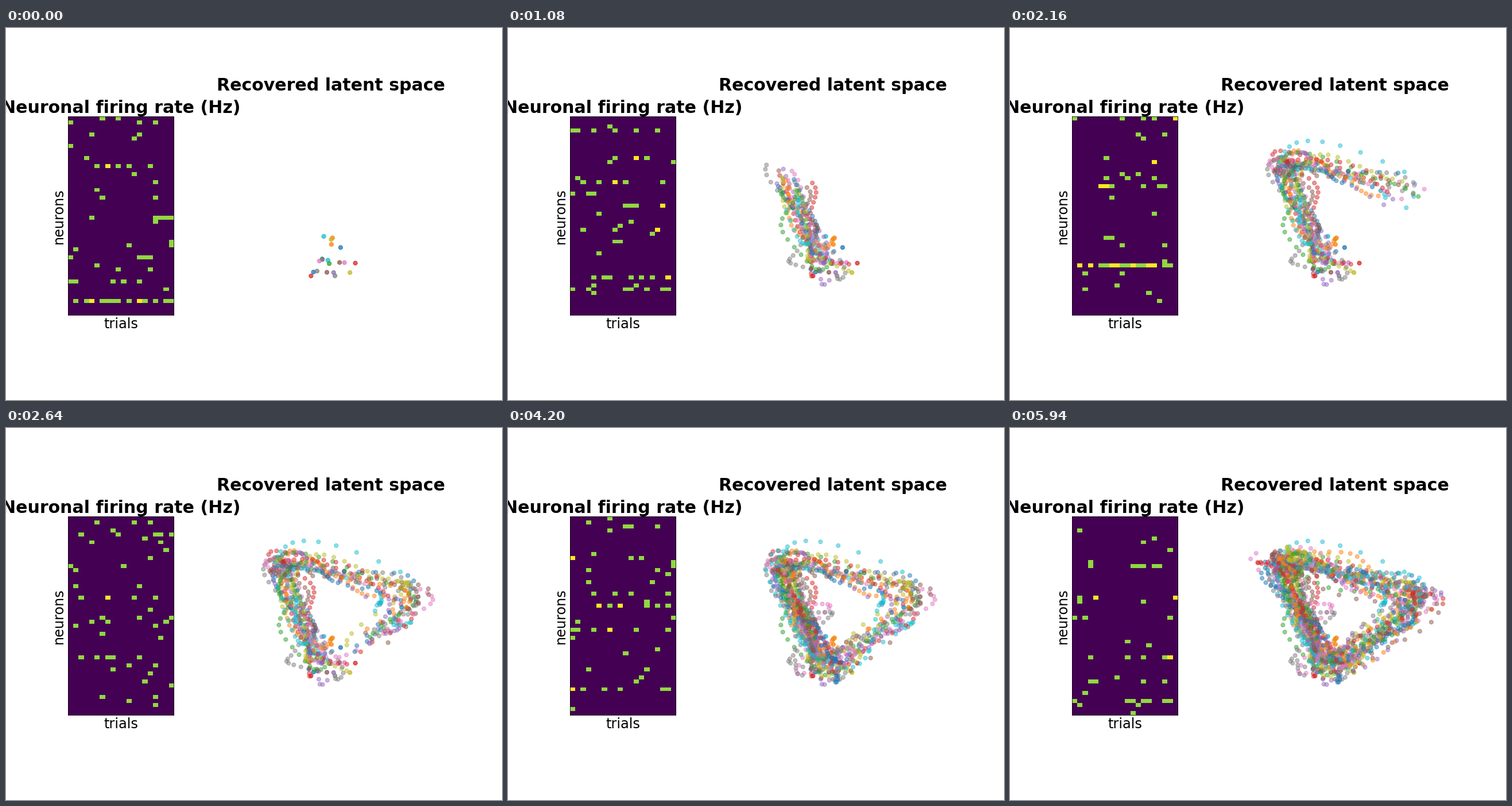
Recreate the animation shown at these times as a matplotlib script. Size 864x648 px, loop 6000 ms.

```python
import numpy as np
import matplotlib.pyplot as plt
from matplotlib.animation import FuncAnimation
from matplotlib.colors import ListedColormap

STEPS, INTERVAL = 100, 60
TRIALS, NEURONS = 20, 50
LAP = 50  # steps for one turn around the latent loop

# Corners of the latent loop, in stage pixels, and when they are passed
CORNER_PHASE = [1, 24, 38]
CORNER_X = [550, 469, 728]
CORNER_Y = [423, 224, 296]

rng = np.random.default_rng(12)
steps = np.arange(STEPS)


def loop_at(phase):
    """Position on the loop, with the corners rounded by averaging."""
    near = phase[:, None] + np.linspace(-2.5, 2.5, 9)
    return np.stack([
        np.interp(near, CORNER_PHASE, values, period=LAP).mean(axis=1)
        for values in (CORNER_X, CORNER_Y)
    ], axis=1)


def wobble():
    """Slow random wave of about unit spread."""
    periods = rng.uniform(14, 48, 4)
    shifts = rng.uniform(0, 2 * np.pi, 4)
    waves = np.sin(2 * np.pi * steps[:, None] / periods + shifts)
    return waves.sum(axis=1) / np.sqrt(2)


def trial_path():
    lead = wobble() * (1.2 + 0.02 * steps)
    drift = np.stack([wobble(), wobble()], axis=1)
    # The cubic term lets a few stretches stray far from the loop.
    return loop_at(steps + lead) + 13 * (drift + 0.1 * drift ** 3)


def latent_points():
    paths = np.stack([trial_path() for _ in range(TRIALS)], axis=1)
    # The starting dots are laid down twice, so they look denser.
    return np.concatenate([paths[:1], paths]).reshape(-1, 2)


def spike_counts():
    """Each neuron fires around its own preferred phase of the loop."""
    preferred = rng.permutation(np.linspace(0, LAP, NEURONS, endpoint=False))
    gain = np.minimum(rng.lognormal(-2.7, 1.2, NEURONS), 0.4)
    preferred[37], gain[37] = 36, 1.2  # the one strong neuron
    gap = (steps[:, None] - preferred + LAP / 2) % LAP - LAP / 2
    rate = 0.018 + gain * np.exp(-(gap / 5) ** 2)
    counts = rng.poisson(rate[..., None], (STEPS, NEURONS, TRIALS))
    return np.minimum(counts, 2)


points = latent_points()
spikes = spike_counts()

plt.rcParams["font.family"] = "DejaVu Sans"
title_font = {"fontsize": 30, "fontweight": "bold"}
fig, (heat, space) = plt.subplots(1, 2, figsize=(12, 9), dpi=72,
                                  facecolor="white", width_ratios=[1, 2.3])

image = heat.imshow(spikes[0], cmap=ListedColormap(["#440154", "#92d741", "#fde725"]),
                    vmin=0, vmax=2, aspect=0.75, interpolation="nearest")
heat.set(xticks=[], yticks=[])
heat.set_title("Neuronal firing rate (Hz)", **title_font)
heat.set_xlabel("trials", fontsize=24)
heat.set_ylabel("neurons", fontsize=24)

# Limits equal to the panel's place on the stage, so data are in pixels
space.set(xlim=(353.3, 777.6), ylim=(539.4, 115.1), box_aspect=1)
space.axis("off")
space.set_title("Recovered latent space", **title_font)
colors = plt.get_cmap("tab10")(np.arange(len(points)) % 10)
dots = space.scatter(points[:, 0], points[:, 1], s=50, c=colors,
                     alpha=0.5, linewidths=1, clip_on=False)


def draw(step):
    image.set_data(spikes[step])
    dots.set_offsets(points[:TRIALS * (step + 2)])
    return image, dots


anim = FuncAnimation(fig, draw, frames=STEPS, interval=INTERVAL,
                     init_func=lambda: draw(0), repeat=True, repeat_delay=0)
plt.show()
```
